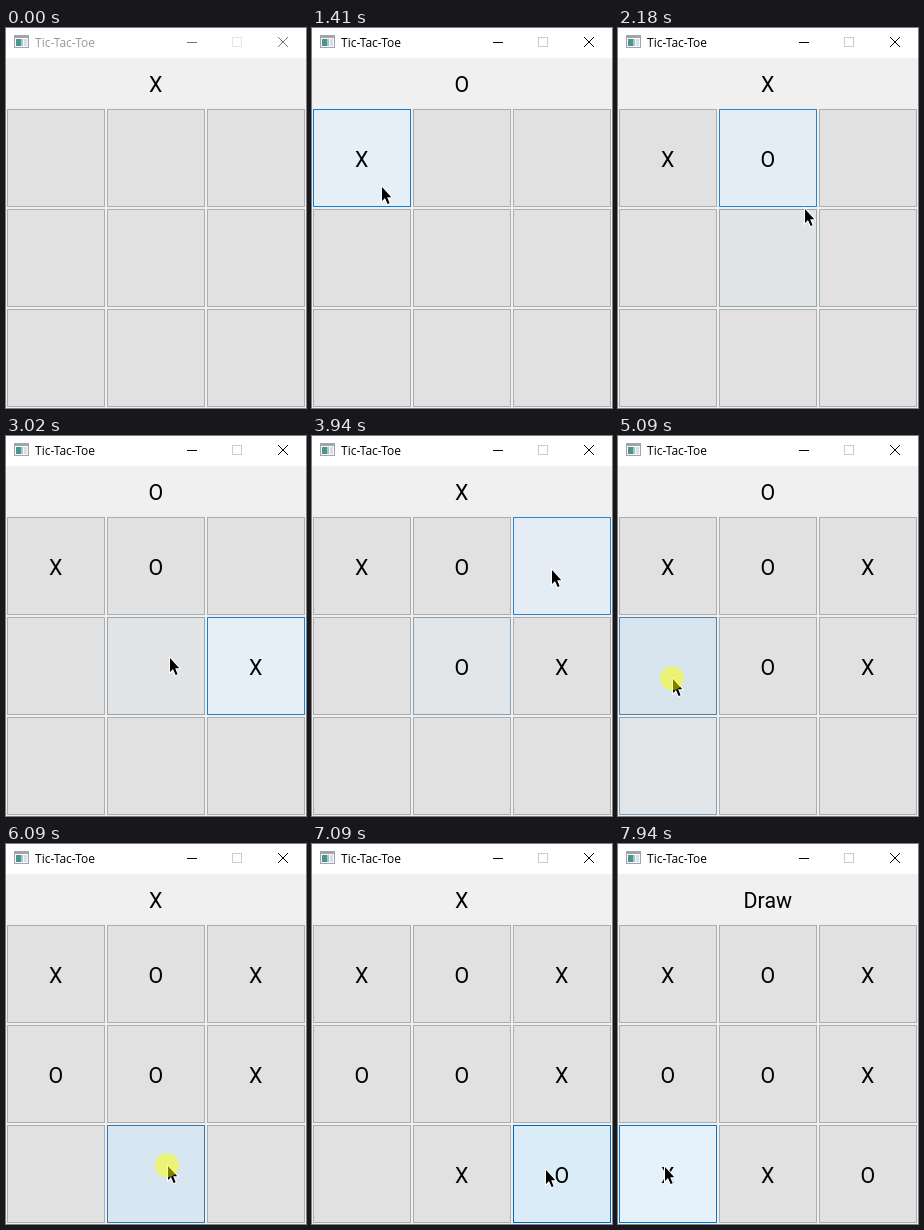
Write an HTML page with a canvas that moves like this. It is 300 px wide and 380 px high and loops after 8000 ms.

```html
<!DOCTYPE html>
<html>
<head>
<meta charset="utf-8">
<title>Tic-Tac-Toe</title>
<style>
  html, body { margin: 0; overflow: hidden; }
  canvas { display: block; }
</style>
</head>
<body>
<canvas id="stage" width="300" height="380"></canvas>
<script>
const ctx = document.getElementById('stage').getContext('2d');
const LOOP = 8000, STEP = 1000 / 13, OFFSET = 12;
const FADE = 250, HOLD = 100;

const NORMAL = { fill: [225, 225, 225], border: [173, 173, 173] };
const HOVER = { fill: [229, 241, 251], border: [0, 120, 215] };
const PRESSED = { fill: [204, 228, 247], border: [0, 84, 153] };

// Where the pointer goes; each stop is pressed unless it only passes by.
const start = { at: 0, x: 216, y: 400, passing: true };
const stops = [
  start,
  { at: 1030, x: 70, y: 159 },
  { at: 1740, x: 152, y: 146 },
  { at: 2265, x: 228, y: 222 },
  { at: 3020, x: 163, y: 222 },
  { at: 3880, x: 240, y: 134 },
  { at: 4600, x: 60, y: 325, passing: true },
  { at: 4945, x: 55, y: 243 },
  { at: 5935, x: 162, y: 322 },
  { at: 6400, x: 234, y: 326, wait: 535 },
  { at: 7350, x: 47, y: 323, wait: 250 }
];
stops.forEach((stop, i) => {
  const from = stop.from = stops[i - 1] || stop;
  stop.travel = 80 + Math.hypot(stop.x - from.x, stop.y - from.y);
  stop.press = stop.at + (stop.wait || 60);
});
const turns = stops.filter(stop => !stop.passing);

const mix = (a, b, p) => a + (b - a) * p;
const mixStyle = (a, b, p) => ({
  fill: a.fill.map((v, i) => mix(v, b.fill[i], p)),
  border: a.border.map((v, i) => mix(v, b.border[i], p))
});
const rgb = c => `rgb(${c.map(Math.round)})`;

function pointer(t) {
  const { from, x, y, at, travel } =
    stops.filter(stop => t >= stop.at - stop.travel).pop() || start;
  const p = Math.min(1, 1 - (at - t) / travel);
  const eased = p * p * (3 - 2 * p);
  return { x: mix(from.x, x, eased), y: mix(from.y, y, eased) };
}

function cellAt({ x, y }) {
  if (y < 80 || y >= 380) return -1;
  return Math.floor((y - 80) / 100) * 3 + Math.floor(x / 100);
}

const isDown = t => turns.some(({ press }) => t >= press && t < press + HOLD);
const marks = turns.map(cellAt);

// Replays hover and press states up to the given step.
function buttonStyles(step) {
  const cells = Array.from({ length: 9 }, () =>
    ({ from: NORMAL, to: NORMAL, since: 0, now: NORMAL }));
  for (let k = 0; k <= step; k++) {
    const t = k * STEP + OFFSET, over = cellAt(pointer(t));
    cells.forEach((cell, i) => {
      const goal = i !== over ? NORMAL : isDown(t) ? PRESSED : HOVER;
      if (goal !== cell.to) {
        cell.from = cell.now;
        cell.to = goal;
        cell.since = t - STEP / 2;
      }
      cell.now = mixStyle(cell.from, cell.to, Math.min(1, (t - cell.since) / FADE));
    });
  }
  return cells.map(cell => cell.now);
}

function rect(color, x, y, w, h) {
  ctx.fillStyle = color;
  ctx.fillRect(x, y, w, h);
}

function frame(color, x, y, w, h) {
  ctx.strokeStyle = color;
  ctx.lineWidth = 1;
  ctx.strokeRect(x + .5, y + .5, w - 1, h - 1);
}

function label(text, x, y) {
  ctx.font = '16pt Roboto, sans-serif';
  ctx.textAlign = 'center';
  ctx.fillStyle = '#000';
  ctx.fillText(text, x, y);
}

function drawTitleBar(active) {
  rect('#fff', 0, 0, 300, 30);
  rect('#a0a6aa', 8, 7, 15, 13);
  rect('#f6f8f9', 9, 10, 13, 9);
  rect('#4a958c', 10, 11, 5, 7);
  rect('#a5c8ca', 15, 11, 2, 7);
  rect('#d6e0e6', 18, 11, 3, 7);

  ctx.font = '12px "Open Sans", sans-serif';
  ctx.textAlign = 'left';
  ctx.fillStyle = active ? '#000' : '#999';
  ctx.fillText('Tic-Tac-Toe', 29, 19);

  const ink = active ? '#000' : '#777';
  rect(ink, 181, 14, 10, 1);
  frame(active ? '#ccc' : '#e4e4e4', 226, 9, 10, 10);
  ctx.strokeStyle = ink;
  ctx.beginPath();
  ctx.moveTo(272, 9); ctx.lineTo(282, 19);
  ctx.moveTo(282, 9); ctx.lineTo(272, 19);
  ctx.stroke();
}

const arrow = new Path2D('M0 0V14L3 11L5.6 17L7.6 16.2L5.2 10.3H9.3Z');

function drawPointer({ x, y }, down) {
  ctx.save();
  ctx.translate(Math.round(x), Math.round(y));
  ctx.strokeStyle = '#fff';
  ctx.lineWidth = 2;
  ctx.stroke(arrow);
  ctx.fillStyle = '#000';
  ctx.fill(arrow);
  if (down) {
    ctx.fillStyle = 'rgba(255, 255, 0, .5)';
    ctx.beginPath();
    ctx.arc(-1, -.8, 12, 0, 2 * Math.PI);
    ctx.fill();
  }
  ctx.restore();
}

function draw(step) {
  const t = step * STEP + OFFSET;
  const played = turns.filter(turn => t >= turn.press + HOLD).length;

  rect('#f0f0f0', 0, 0, 300, 380);
  drawTitleBar(t >= turns[0].press);
  label(played === 9 ? 'Draw' : 'XO'[played % 2], 149.8, 63.5);

  buttonStyles(step).forEach(({ fill, border }, i) => {
    const x = i % 3 * 100 + 1, y = Math.floor(i / 3) * 100 + 81;
    rect(rgb(fill), x, y, 98, 98);
    frame(rgb(border), x, y, 98, 98);
    const turn = marks.indexOf(i);
    if (turn < played) label('XO'[turn % 2], x + 48.8, y + 57.5);
  });

  drawPointer(pointer(t), isDown(t));
}

let shown = -1;
function tick() {
  const t = performance.now() % LOOP;
  const step = Math.max(0, Math.floor((t - OFFSET) / STEP));
  if (step !== shown) draw(shown = step);
  requestAnimationFrame(tick);
}
tick();
</script>
</body>
</html>
```
